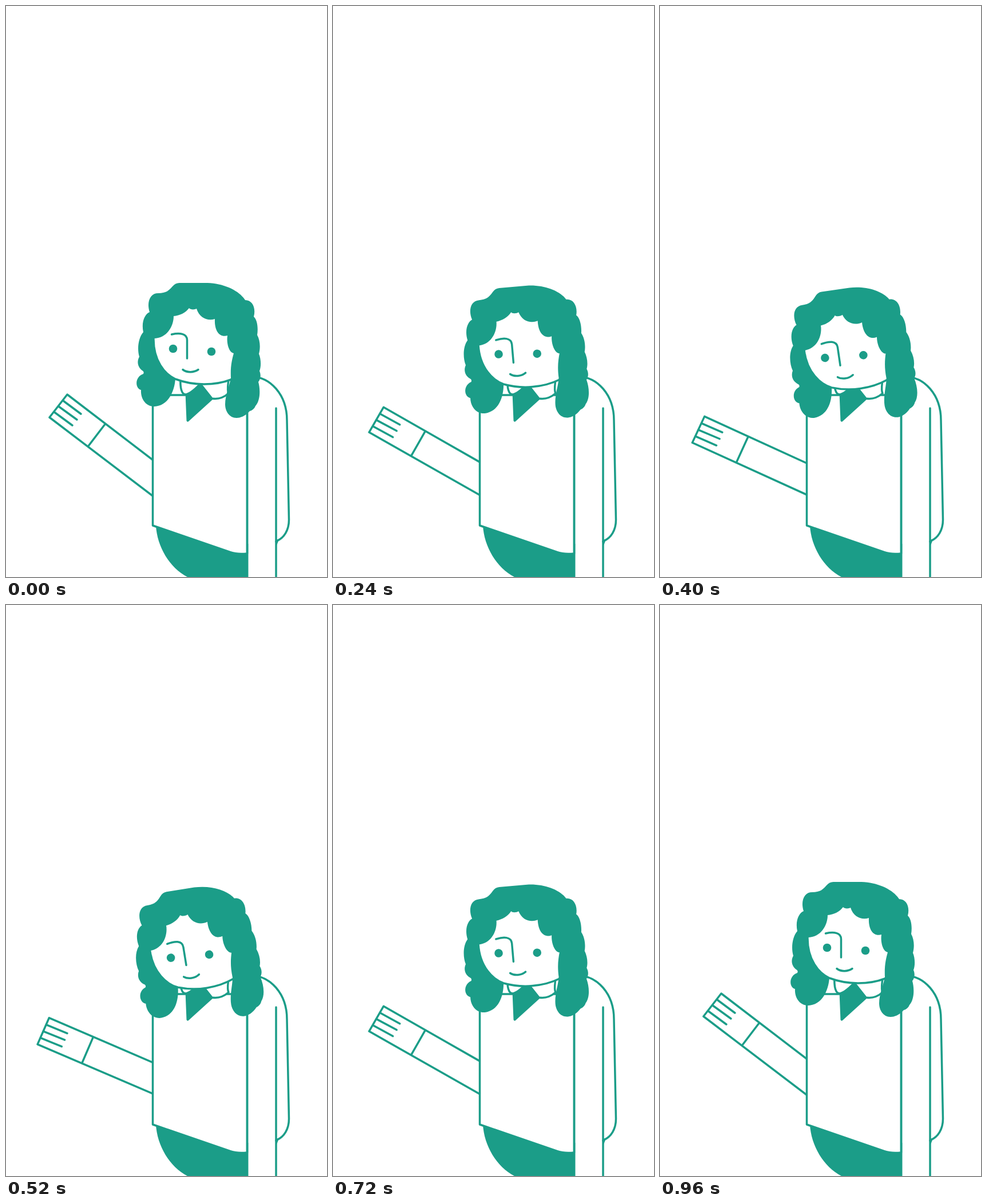
Recreate the animation shown at these times as an HTML page. Size 561 px wide and 998 px high, loop 1120 ms.

```html
<!DOCTYPE html>
<html lang="en">
<head>
<meta charset="utf-8">
<title>Waving woman</title>
<style>
  html, body { margin: 0; height: 100%; overflow: hidden; background: #fff; }
  svg { display: block; width: 100%; height: 100%; }
  path { fill: none; stroke: #1b9d88; stroke-width: 3.5; stroke-linecap: round; stroke-linejoin: round; }
  .paper { fill: #fff; }
  .solid, circle { fill: #1b9d88; stroke: none; }
</style>
</head>
<body>
<svg viewBox="0 0 561 998">
  <g id="arm">
    <path d="M270 803.7 L107 679 L76 719 L270 866.7 M173 731 L144 769"/>
    <path d="M99.3 689.5 L131 713 M91.5 699.5 L124 723 M84 709.5 L116 733"/>
  </g>

  <g id="body">
    <path class="solid" d="M262 908 C264 945 286 982 317 998 H423.3 V940 Z"/>
    <path class="solid" d="M470 935 L477 933 C475 937 474 941 472.5 944 Z"/>
    <path d="M425 648 C462 646 491 680 491 724 L494.5 898 C494.5 916 486 930 473 935"/>
    <path class="paper" d="M256.5 680 V908 L393 955 C402 958 411 958 421.5 957 V680 Z"/>
    <path d="M421.5 690 V1002 M472 703 V1002"/>
    <path class="solid" d="M313.5 676 L315.5 725 Q317 728 319 726 L362 687 L338 660 Z"/>
    <path class="paper" d="M305 650 C304 668 307 679 314 679 C322 678 331 669 338 662"/>
    <path class="paper" d="M341 662 L360 686 C372 688 382 683 389 677 C386 671 388 663 389 652"/>
  </g>

  <g id="head">
    <path class="paper" d="M258 580 C257 620 278 644 296 652 C312 658 329 661 346 661
      C365 661 380 658 393 653 L408 640 L400 530 L340 505 L275 525 Z"/>
    <path class="solid" d="M303 484 H352 C382 485 408 498 418 514
      C431 514 437 528 433 543 C439 548 441 562 439 575 C444 584 445 597 442 608
      C446 618 446 630 443 638 C446 645 445 652 441 657 C445 672 444 690 436 699
      C434 704 430 707 426 708 C418 717 409 720 403 720 C390 720 383 708 383 696
      C383 680 391 663 393 650 C392 630 395 618 398 607
      C390 606 385 590 387 576 C372 580 364 566 365 547 C352 551 338 545 333 529
      C330 531 322 531 320 528 C314 536 304 541 293 542 C293 560 281 581 258 581
      C257 620 278 644 296 652 C294 675 283 699 259 700
      C244 700 235 686 236 671 C225 668 225 648 240 643 Q242 639 238 637
      C229 630 229 620 233 613 C229 600 231 580 240 570 C236 552 243 538 251 535
      C246 520 250 502 266 502 C280 502 285 497 291 490 Q296 484 303 484 Z"/>
    <circle cx="292" cy="599" r="7.3"/>
    <circle cx="359" cy="604" r="7.3"/>
    <path d="M289.5 574 C303 571 316.5 572 316.5 584 V616"/>
    <path d="M309 635.5 C316 641 328 641 336 635.5"/>
  </g>
</svg>
<script>
  const LOOP = 1120, HALF = 480, STEP = 40;
  const arm = document.getElementById('arm');
  const head = document.getElementById('head');
  let start;

  const turn = (el, angle, x, y) =>
    el.setAttribute('transform', `rotate(${angle} ${x} ${y})`);

  function draw(now) {
    start ??= now;
    const t = Math.floor((now - start) % LOOP / STEP) * STEP;
    // Steady swing down and back, then a rest.
    const swing = Math.max(0, 1 - Math.abs(t / HALF - 1));
    turn(arm, -15.4 * swing, 263, 828);
    turn(head, -10 * swing, 400, 632);
    requestAnimationFrame(draw);
  }
  requestAnimationFrame(draw);
</script>
</body>
</html>
```
